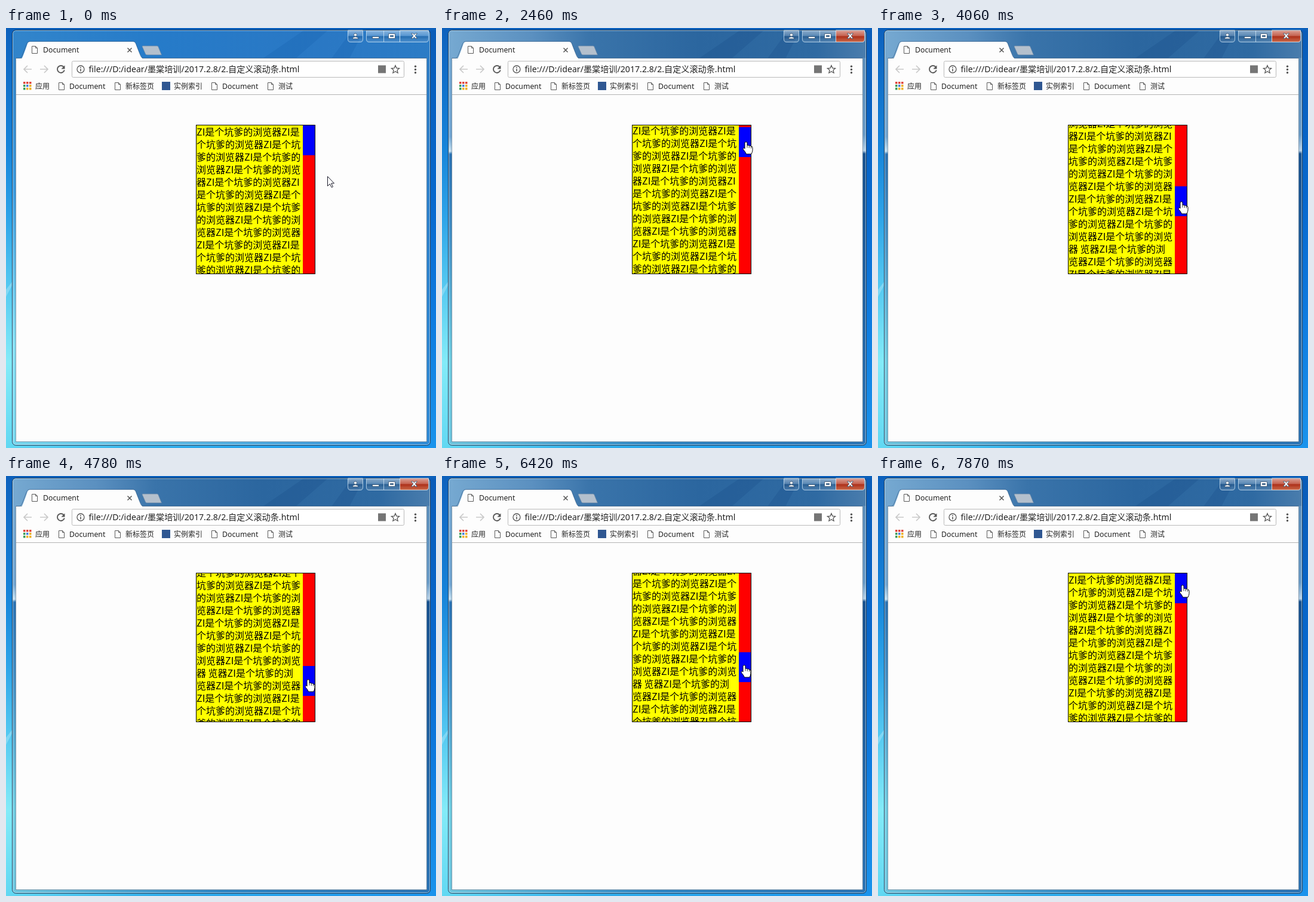
Animation of 720 by 703 pixels, one loop 8000 ms. Source, as an HTML page:

```html
<!DOCTYPE html>
<html lang="zh-CN">
<head>
<meta charset="utf-8">
<title>Document</title>
<style>
html, body { margin: 0; width: 100%; height: 100%; overflow: hidden; }
#stage { position: relative; width: 720px; height: 703px; overflow: hidden; }
svg { position: absolute; left: 0; top: 0; display: block; }
svg text { font: 12px "Noto Sans", "Noto Sans CJK SC", sans-serif; fill: #222; }
#box {
  position: absolute; left: 318px; top: 162px; width: 198px; height: 248px;
  border: 1px solid #000; background: #ff0; overflow: hidden;
}
#copy {
  position: absolute; left: 0; top: 0; width: 176px;
  font: 350 16px/21px "Noto Sans CJK SC", "Noto Sans CJK", sans-serif; color: #000;
}
#bar { position: absolute; left: 178px; top: 0; width: 20px; height: 248px; background: #f00; }
#thumb { width: 20px; height: 50px; background: #00f; }
</style>
</head>
<body>
<div id="stage">
<svg width="720" height="703" viewBox="0 0 720 703">
  <defs>
    <linearGradient id="skyL" x2="0" y2="1">
      <stop stop-color="#0d61bd"/><stop offset=".28" stop-color="#1683d9"/>
      <stop offset=".45" stop-color="#2da3e8"/><stop offset=".62" stop-color="#55c9f1"/>
      <stop offset=".8" stop-color="#83ebf8"/><stop offset="1" stop-color="#62d8f2"/>
    </linearGradient>
    <linearGradient id="skyR" x2="0" y2="1">
      <stop stop-color="#0a5cb8"/><stop offset=".4" stop-color="#0868cd"/>
      <stop offset=".7" stop-color="#0f7ce0"/><stop offset="1" stop-color="#1a93ec"/>
    </linearGradient>
    <linearGradient id="skyB">
      <stop stop-color="#62d8f2"/><stop offset=".35" stop-color="#32aeea"/><stop offset="1" stop-color="#1a93ec"/>
    </linearGradient>
    <linearGradient id="idleTop">
      <stop stop-color="#3285cb"/><stop offset=".35" stop-color="#267bc9"/>
      <stop offset=".75" stop-color="#2a78c4"/><stop offset="1" stop-color="#2c7cc6"/>
    </linearGradient>
    <linearGradient id="idleL" x2="0" y2="1">
      <stop stop-color="#3285cb"/><stop offset=".35" stop-color="#3a9ade"/>
      <stop offset=".75" stop-color="#86dff2"/><stop offset="1" stop-color="#79d8ee"/>
    </linearGradient>
    <linearGradient id="idleR" x2="0" y2="1">
      <stop stop-color="#2c7cc6"/><stop offset="1" stop-color="#2f8ad6"/>
    </linearGradient>
    <linearGradient id="liveTop">
      <stop stop-color="#76a9d1"/><stop offset=".2" stop-color="#5b90c0"/>
      <stop offset=".34" stop-color="#3a74aa"/><stop offset=".6" stop-color="#2b669f"/>
      <stop offset=".88" stop-color="#2f6aa2"/><stop offset="1" stop-color="#4a7dad"/>
    </linearGradient>
    <linearGradient id="liveL" x2="0" y2="1">
      <stop stop-color="#76a9d1"/><stop offset=".26" stop-color="#72a6d2"/>
      <stop offset=".295" stop-color="#c4dff0"/><stop offset=".302" stop-color="#2a72b3"/>
      <stop offset=".5" stop-color="#4490c5"/><stop offset=".8" stop-color="#70cce0"/>
      <stop offset="1" stop-color="#6fc6de"/>
    </linearGradient>
    <linearGradient id="liveR" x2="0" y2="1">
      <stop stop-color="#5c8fbc"/><stop offset=".2" stop-color="#6a9cc8"/>
      <stop offset=".242" stop-color="#b8d2e8"/><stop offset=".25" stop-color="#17518f"/>
      <stop offset="1" stop-color="#2a73b4"/>
    </linearGradient>
    <linearGradient id="idleB"><stop stop-color="#79d8ee"/><stop offset="1" stop-color="#2f8ad6"/></linearGradient>
    <linearGradient id="liveB"><stop stop-color="#6fc6de"/><stop offset=".5" stop-color="#2f86c4"/><stop offset="1" stop-color="#2a73b4"/></linearGradient>
    <linearGradient id="glass" x2="0" y2="1">
      <stop stop-color="#fff" stop-opacity=".45"/><stop offset=".48" stop-color="#fff" stop-opacity=".2"/>
      <stop offset=".5" stop-color="#024" stop-opacity=".18"/><stop offset="1" stop-color="#fff" stop-opacity=".15"/>
    </linearGradient>
    <linearGradient id="red" x2="0" y2="1">
      <stop stop-color="#dca095"/><stop offset=".48" stop-color="#c4604e"/>
      <stop offset=".5" stop-color="#ab2d18"/><stop offset="1" stop-color="#cc6a4a"/>
    </linearGradient>
    <clipPath id="win"><rect x="10.5" y="3.5" width="700" height="695" rx="6"/></clipPath>
    <g id="page"><path d="M.5.5H6.5L9.5 3.5V12.500H.5ZM6.500.5V3.500H9.500" fill="#fff" stroke="#5a5a5a"/></g>
  </defs>

  <rect width="720" height="703" fill="url(#skyB)"/>
  <rect width="360" height="699" fill="url(#skyL)"/>
  <rect x="360" width="360" height="699" fill="url(#skyR)"/>
  <rect width="720" height="4" fill="#0c60bb"/>
  <path d="M0 438L10 425V431L0 450Z" fill="#fff" opacity=".25"/>

  <g clip-path="url(#win)">
    <g id="idle">
      <rect x="10" y="3" width="701" height="50" fill="url(#idleTop)"/>
      <rect x="10" y="50" width="8" height="642" fill="url(#idleL)"/>
      <rect x="703" y="50" width="8" height="642" fill="url(#idleR)"/>
      <rect x="10" y="691" width="701" height="9" fill="url(#idleB)"/>
      <path d="M430 51L500 3H540L485 51ZM545 51L580 3H600L575 51Z" fill="#0b4f9c" opacity=".16"/>
    </g>
    <g id="live">
      <rect x="10" y="3" width="701" height="50" fill="url(#liveTop)"/>
      <rect x="10" y="3" width="8" height="689" fill="url(#liveL)"/>
      <rect x="703" y="50" width="8" height="642" fill="url(#liveR)"/>
      <rect x="10" y="691" width="701" height="9" fill="url(#liveB)"/>
      <path d="M430 51L500 3H540L485 51ZM545 51L580 3H600L575 51Z" fill="#0b3f78" opacity=".18"/>
    </g>
  </g>
  <rect x="11.500" y="4.500" width="698" height="693" rx="5" fill="none" stroke="#d8f0ff" stroke-opacity=".6"/>
  <rect x="10.500" y="3.500" width="700" height="695" rx="6" fill="none" stroke="#132c47" stroke-opacity=".85"/>

  <g stroke="#d5e8f6" stroke-opacity=".75">
    <path d="M572.500 4V19Q572.500 23.500 577 23.500H593Q597.500 23.500 597.500 19V4Z" fill="url(#glass)"/>
    <path d="M603.500 4V19Q603.500 23.500 608 23.500H659.500V4M632.500 4V23" fill="url(#glass)"/>
    <path d="M659.500 4V23.500H703Q707.500 23.500 707.500 19V4Z" fill="url(#glass)"/>
    <path id="close" d="M659.500 4V23.500H703Q707.500 23.500 707.500 19V4Z" fill="url(#red)"/>
  </g>
  <g fill="#fff" stroke="#33506e" stroke-width=".8">
    <circle cx="585" cy="11.500" r="2.500"/>
    <path d="M580.500 18V16.500Q585 13 589.500 16.500V18Z"/>
    <rect x="613.500" y="14.500" width="11" height="3"/>
    <path d="M640.500 9.500H651.500V17.500H640.500ZM643.500 12.500V14.500H648.500V12.500Z" fill-rule="evenodd"/>
    <path d="M678.500 9H681.500L683.500 11.200 685.500 9H688.500L685.200 13.200 688.500 17.500H685.500L683.500 15.200 681.500 17.500H678.500L681.800 13.200Z"/>
  </g>

  <rect x="16.500" y="50.500" width="688" height="642" fill="#fdfdfd" stroke="#31506d" stroke-opacity=".5"/>
  <path d="M18 51.500H26Q28 49 36 26Q37 23 40 23H213Q216 23 217 26Q226 50 229 51.500H703" fill="#fdfdfd"/>
  <path d="M17 50.500H23Q26 49 27 46L34.500 26.500Q36 22.500 40 22.500H213Q216 22.500 217.500 26L225.500 47Q227 50.500 230 50.500H704" fill="none" stroke="#3f6790" stroke-opacity=".7"/>
  <path d="M229 30H253Q254.500 30 255 31.500L260.500 45H236Q234 45 233.500 43.500L228 31Q228 30 229 30Z" fill="#b4c0cd" stroke="#6787a6" stroke-width=".8"/>
  <path d="M203.500 33.500L210.500 40.500M210.500 33.500L203.500 40.500" stroke="#555" stroke-width="1.500"/>
  <path d="M17 111.500H704" stroke="#b4b4b4"/>

  <g fill="none" stroke="#c9c9c9" stroke-width="1.700">
    <path d="M43 69H30.500M36 63L30 69 36 75"/>
    <path d="M57 69H69.500M64 63L70 69 64 75"/>
  </g>
  <path d="M96.700 65.200A6 6 0 1 0 97.800 70.500" fill="none" stroke="#555" stroke-width="1.900"/>
  <path d="M98.500 62.500V68.500H92.500Z" fill="#555"/>
  <rect x="110.500" y="55.500" width="556" height="27" rx="2" fill="#fff" stroke="#b9b9b9"/>
  <circle cx="125" cy="69" r="6" fill="none" stroke="#555" stroke-width="1.300"/>
  <path d="M125 65.300V66.900M125 68.200V72.600" stroke="#555" stroke-width="1.600"/>
  <rect x="623" y="62.500" width="13" height="13" fill="#757575"/>
  <path d="M652 62.700L653.900 67.100 658.600 67.500 655 70.600 656.100 75.200 652 72.700 647.900 75.200 649 70.600 645.400 67.500 650.100 67.100Z" fill="none" stroke="#555" stroke-width="1.300"/>
  <g fill="#555"><circle cx="685.500" cy="64.300" r="1.700"/><circle cx="685.500" cy="69.500" r="1.700"/><circle cx="685.500" cy="74.700" r="1.700"/></g>
  <g id="apps"></g>
  <rect x="261" y="90" width="14" height="14" fill="#2f5792"/>
  <g id="labels"></g>
</svg>

<div id="box">
  <div id="copy"></div>
  <div id="bar"><div id="thumb"></div></div>
</div>

<svg width="720" height="703" viewBox="0 0 720 703">
  <path id="arrow" d="M.5.5V16.500L4.300 13 7.200 18.800 9.400 17.800 6.700 12H11.500Z" fill="#fff" stroke="#1a1a2a"/>
  <g id="hand" stroke="#000" stroke-linejoin="round">
    <path d="M-2 1.800Q0-.8 2 1.800V6.500Q4.200 5.200 5.300 7.300 7.400 6 8.500 8.300 11 7.800 11 10.500V14.500Q11 17 9 21H.5Q-1 17-4.600 13.500-5.500 11-3.600 10.700-2.700 10.900-2 12Z" fill="#fff"/>
    <path d="M2 6.500V10.500M5.300 7.500V11M8.500 8.500V11.500" fill="none" stroke-width=".8"/>
  </g>
</svg>
</div>
<script>
const LOOP = 8000;
const $ = id => document.getElementById(id);

const phrase = 'ZI是个坑爹的浏览器';
$('copy').textContent = phrase.repeat(16) + ' 览器' + phrase.repeat(6);

const label = (x, y, text, size = 12) =>
  `<text x="${x}" y="${y}" style="font-size:${size}px">${text}</text>`;
const page = (x, y) => `<use href="#page" x="${x}" y="${y}"/>`;

$('labels').innerHTML =
  page(43, 30) + label(62, 41, 'Document', 12.3) +
  label(138.5, 74, 'file:///D:/idear/墨棠培训/2017.2.8/2.自定义滚动条.html', 14.15) +
  [88, 182, 344, 438].map(x => page(x, 91)).join('') +
  label(49, 102, '应用') + label(106, 102, 'Document', 12.3) +
  label(200, 102, '新标签页') + label(281, 102, '实例索引') +
  label(362, 102, 'Document', 12.3) + label(456, 102, '测试');

const [R, G, B, Y] = ['#e0443a', '#3a9b55', '#3f7de0', '#eeb020'];
$('apps').innerHTML = [R, R, R, G, B, Y, G, Y, Y].map((c, i) =>
  `<rect x="${29 + i % 3 * 5}" y="${90 + (i / 3 | 0) * 5}" width="3.500" height="3.500" fill="${c}"/>`).join('');

// Screen updates: first time, last time, count
const bursts = [
  [560, 1590, 8], [2460, 3120, 6], [3240, 3360, 2], [3510, 4060, 5], [4210, 4510, 3],
  [4630, 5480, 7], [5630, 5760, 2], [6030, 6930, 8], [7050, 7050, 1], [7200, 7870, 6]
];

// Key points: time, value
const mouseX = [[430, 538], [1590, 507], [2340, 507], [2460, 509], [3120, 510],
  [4060, 508], [5480, 504], [5760, 503], [6930, 508], [7870, 510]];
const mouseY = [[430, 248], [1590, 186], [2340, 186], [2460, 190], [3120, 217], [4060, 290],
  [5480, 390], [5630, 394], [5760, 395], [5900, 395], [6930, 238], [7050, 224], [7870, 182]];
const thumbY = [[2340, 0], [2460, 3], [3120, 30], [4060, 102], [5340, 198],
  [5960, 198], [6930, 58], [7050, 45], [7800, 0]];

function snap(t) {
  let held = 0;
  for (const [a, b, n] of bursts) {
    if (t < a) break;
    const step = n > 1 ? (b - a) / (n - 1) : 1;
    held = a + Math.min(n - 1, Math.floor((t - a) / step + 1e-6)) * step;
  }
  return held;
}

function at(keys, t) {
  const i = keys.findIndex(k => k[0] > t);
  if (i === 0) return keys[0][1];
  if (i < 0) return keys[keys.length - 1][1];
  const [t0, v0] = keys[i - 1], [t1, v1] = keys[i];
  return v0 + (v1 - v0) * (t - t0) / (t1 - t0);
}

const show = (id, on) => $(id).setAttribute('visibility', on ? 'visible' : 'hidden');

function draw(t) {
  const s = snap(t);
  const x = Math.round(at(mouseX, s)), y = Math.round(at(mouseY, s));
  const thumb = Math.round(at(thumbY, s));
  const over = x < 517, active = t >= 1870;

  $('thumb').style.transform = `translateY(${thumb}px)`;
  $('copy').style.top = -Math.round(thumb * 149 / 198) + 'px';
  for (const id of ['arrow', 'hand']) $(id).setAttribute('transform', `translate(${x} ${y})`);
  show('arrow', !over);
  show('hand', over);
  show('idle', !active);
  show('live', active);
  show('close', active);
}

const start = performance.now();
function tick() {
  draw((performance.now() - start) % LOOP);
  requestAnimationFrame(tick);
}
tick();
</script>
</body>
</html>
```
